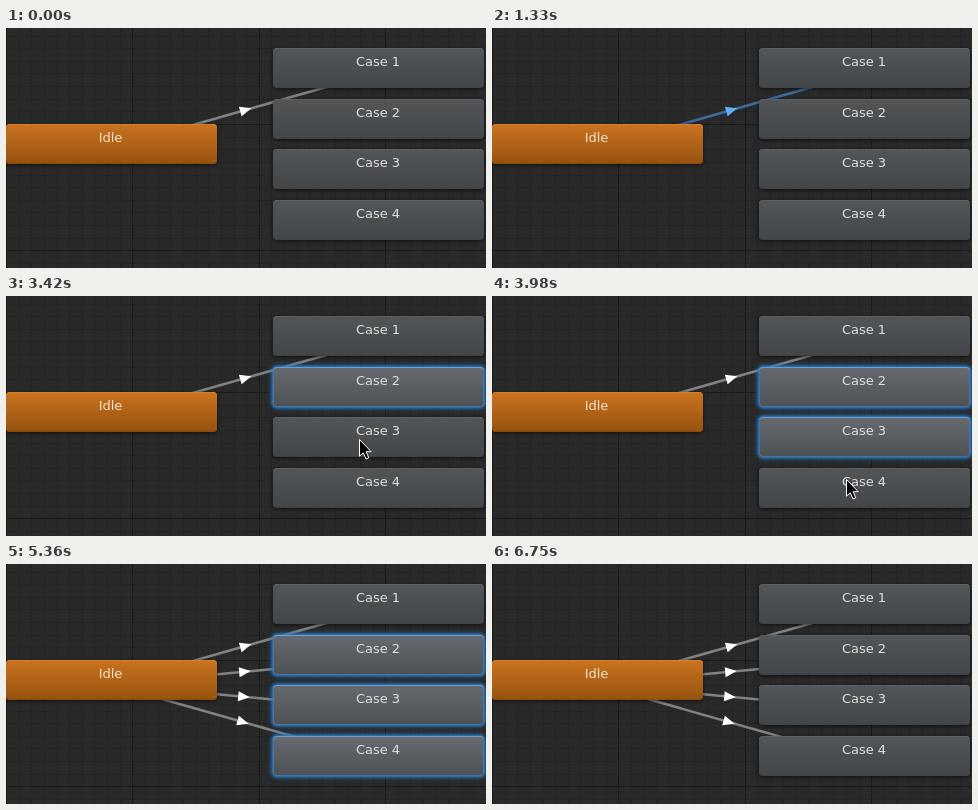
Animation, 480 px wide and 240 px high, one loop 7.19 s. Source, as an HTML page:

```html
<!DOCTYPE html>
<html lang="en">
<head>
<meta charset="utf-8">
<title>State transitions</title>
<style>
  html, body { margin: 0; width: 100%; height: 100%; overflow: hidden; background: #292929; }
  #stage { position: relative; width: 480px; height: 240px; overflow: hidden; }
  svg { position: absolute; left: 0; top: 0; }
  .minor { fill: #242424; }
  .major { fill: #1a1a1a; }
  .node {
    position: absolute; left: 267px; width: 211px; height: 40px;
    box-sizing: border-box; padding: 6px 1px 0 0; border-radius: 4px;
    font: 13px/15px "DejaVu Sans", sans-serif; text-align: center; color: #dedede;
    background: linear-gradient(#525659, #4b4e51 50%, #434648);
    box-shadow: inset 0 1px #5b5f62, inset 0 -1px #3c3e40, 0 1px 3px 1px rgba(0, 0, 0, .4);
  }
  .idle {
    left: 0; top: 96px; padding-right: 2px; color: #f3e3d0;
    background: linear-gradient(#ca741f, #96520f);
    box-shadow: inset 0 1px #d2802e, inset 0 -1px #88490d, 0 1px 3px 1px rgba(0, 0, 0, .4);
  }
  .node.selected {
    background: linear-gradient(#676b71, #5a5e62 50%, #4e5154);
    box-shadow: inset 0 1px #6f9cc4, inset 0 0 0 1px #47759d, 0 0 3px 1px #2a83d2, 0 0 5px 2px rgba(34, 104, 168, .6);
  }
  .link line { stroke: #828282; stroke-width: 2.5; }
  .link path { fill: #fff; }
  .link.selected line { stroke: #3c6a9e; }
  .link.selected path { fill: #62abf5; }
</style>
</head>
<body>
<div id="stage">
  <svg id="graph" width="480" height="240"></svg>
  <div class="node idle">Idle</div>
  <svg width="480" height="240">
    <path id="cursor" d="M.5.5V17.2L4.3 13.8 7.1 20 9.8 18.8 7.1 12.7H12.2Z" fill="#000" stroke="#fff"/>
  </svg>
</div>
<script>
  const LOOP = 7190;
  const SAMPLE = 65;
  const CELL = 12.64;
  const stage = document.getElementById('stage');
  const graph = document.getElementById('graph');
  const cursor = document.getElementById('cursor');

  function add(parent, tag, attrs) {
    const el = document.createElementNS('http://www.w3.org/2000/svg', tag);
    for (const name in attrs) el.setAttribute(name, attrs[name]);
    return parent.appendChild(el);
  }

  function drawGrid() {
    for (const kind of ['minor', 'major']) {
      for (let i = -10; i < 40; i++) {
        if ((i % 10 === 0) !== (kind === 'major')) continue;
        const shift = Math.round(i * CELL);
        add(graph, 'rect', { class: kind, x: shift, y: 0, width: 1, height: 240 });
        add(graph, 'rect', { class: kind, x: 0, y: 96 + shift, width: 480, height: 1 });
      }
    }
  }

  // Links join node centres, shifted 5px sideways, with the arrow at the midpoint.
  function makeLink(top) {
    const dx = 267, dy = top - 96;
    const half = Math.hypot(dx, dy) / 2;
    const angle = Math.atan2(dy, dx) * 180 / Math.PI;
    const group = add(graph, 'g', {
      class: 'link',
      transform: `translate(238.2 ${115.2 + dy / 2}) rotate(${angle}) translate(0 5)`
    });
    add(group, 'line', { x1: -half, x2: half });
    add(group, 'path', { d: 'M-5.5-5 6 0-5.5 5Z' });
    return group;
  }

  function makeNode(top, i) {
    const node = document.createElement('div');
    node.className = 'node';
    node.style.top = top + 'px';
    node.textContent = 'Case ' + (i + 1);
    return stage.insertBefore(node, cursor.parentNode);
  }

  drawGrid();
  const tops = Array.from({ length: 4 }, (_, i) => Math.round(20 + i * 4 * CELL));
  const links = tops.map(makeLink);
  const nodes = tops.map(makeNode);

  // Each visit of the pointer: when it leaves, and the points it eases through.
  const visits = [
    { end: 1330, points: [
      { t: 170, x: 278, y: 226 }, { t: 630, x: 222, y: 67 }, { t: 830, x: 234, y: 79 },
      { t: 1010, x: 234, y: 79 }, { t: 1330, x: 290, y: 108 }] },
    { end: 4310, points: [
      { t: 2700, x: 447, y: 72 }, { t: 2960, x: 360, y: 88 }, { t: 3090, x: 360, y: 88 },
      { t: 3350, x: 353, y: 143 }, { t: 3600, x: 353, y: 143 }, { t: 3980, x: 354, y: 185 },
      { t: 4110, x: 354, y: 187 }, { t: 4310, x: 410, y: 240 }] },
    { end: 6750, points: [
      { t: 5980, x: 330, y: 190 }, { t: 6175, x: 187, y: 184 }, { t: 6305, x: 198, y: 186 },
      { t: 6555, x: 198, y: 186 }, { t: 6685, x: 374, y: 222 }] }
  ];
  const linkPicked = 890, linksAdded = 5360, cleared = 6370;
  const picked = [Infinity, 3090, 3540, 4050];

  const smooth = p => p * p * (3 - 2 * p);

  function pointerAt(t) {
    const visit = visits.find(({ end, points }) => t >= points[0].t && t < end);
    if (!visit) return null;
    const { points } = visit;
    const start = points[0].t;
    const held = start + Math.floor((t - start) / SAMPLE) * SAMPLE;
    const next = points.findIndex(point => point.t > held);
    if (next < 0) return points[points.length - 1];
    const a = points[next - 1], b = points[next];
    const p = smooth((held - a.t) / (b.t - a.t));
    return { x: Math.round(a.x + (b.x - a.x) * p), y: Math.round(a.y + (b.y - a.y) * p) };
  }

  function render(now) {
    const t = now % LOOP;
    links.forEach((link, i) => {
      link.style.display = i === 0 || t >= linksAdded ? '' : 'none';
    });
    links[0].classList.toggle('selected', t >= linkPicked && t < picked[1]);
    nodes.forEach((node, i) => node.classList.toggle('selected', t >= picked[i] && t < cleared));

    const pointer = pointerAt(t);
    cursor.style.display = pointer ? '' : 'none';
    if (pointer) cursor.setAttribute('transform', `translate(${pointer.x} ${pointer.y})`);
  }

  function tick() {
    render(performance.now());
    requestAnimationFrame(tick);
  }
  tick();
</script>
</body>
</html>
```
